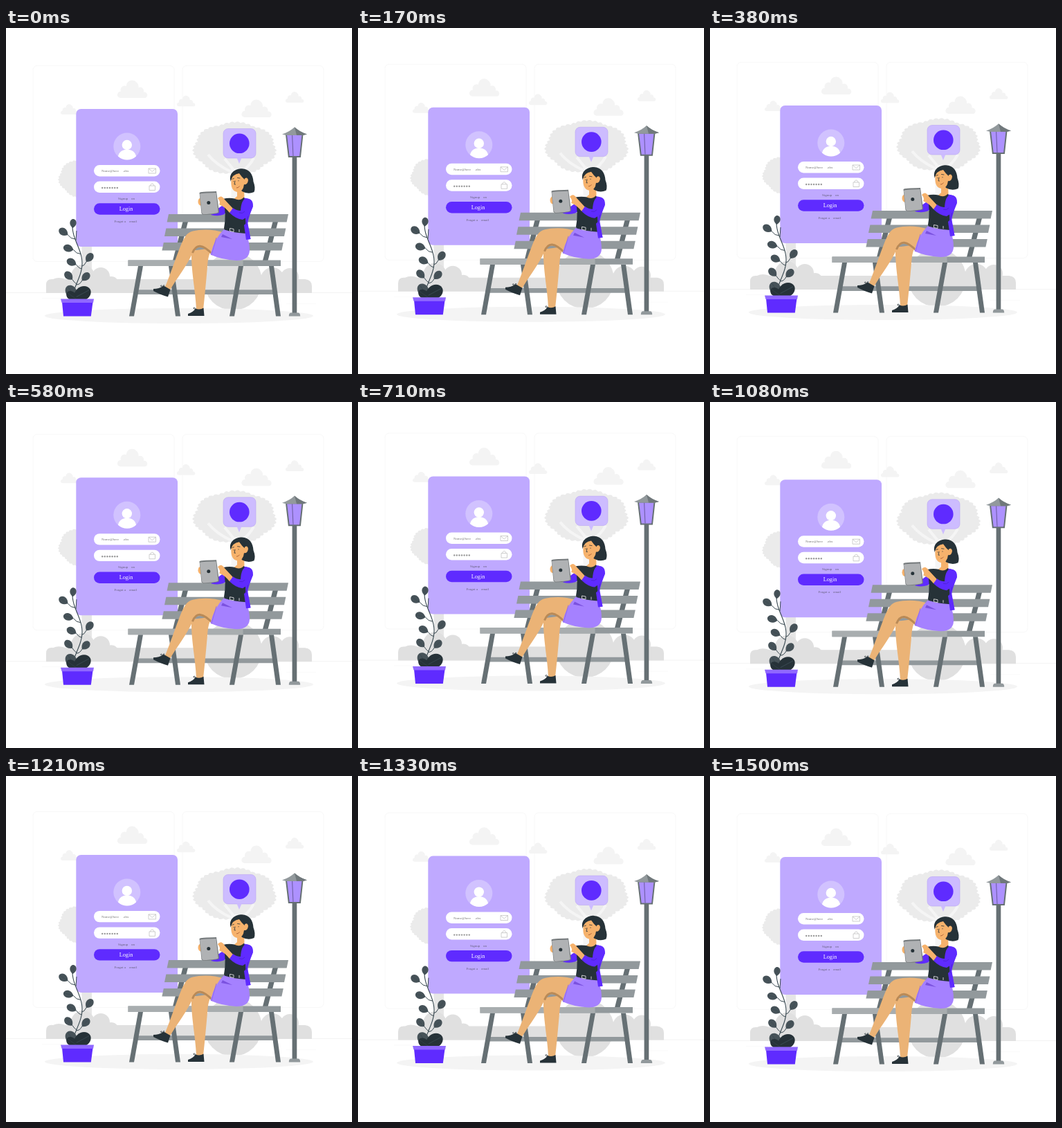
Write an HTML page that moves like this. It is 500 px wide and 500 px high and loops after 1540 ms.

```html
<!DOCTYPE html>
<html lang="en">
<head>
<meta charset="utf-8">
<title>Login on a park bench</title>
<style>
html, body { margin: 0; width: 100%; height: 100%; overflow: hidden; background: #fff; }
svg { display: block; width: 100vw; height: 100vh; }
text { font-family: "Liberation Serif", serif; }
.skin { fill: #ebb376; }
.face { fill: #f6b26c; }
.shade { fill: none; stroke: #b98a57; }
.dark { fill: #263238; }
.violet { fill: #5f2bff; }
.wood { fill: #92999c; }
.iron { fill: #667074; }
.line { fill: none; stroke: #263238; stroke-linecap: round; }
</style>
</head>
<body>
<svg viewBox="0 0 500 500">
<defs>
  <path id="cloud" d="M4 26C-2 25-1 17 5 16.5C3 11 9 7 13 9C13 1 22-2 27 3C30 5 31 8 30.5 11C35 9 39 13 38 17.5C44 17 45 25 40 26Z"/>
</defs>
<g id="scene">
  <g fill="none" stroke="#f8f8f8">
    <rect x="39" y="54.5" width="204" height="283" rx="6"/>
    <rect x="255" y="54.5" width="204" height="283" rx="6"/>
    <path stroke="#eee" stroke-width=".7" d="M0 382.5H500"/>
    <path stroke-width=".7" d="M52 390.5H84M405 398.5H448"/>
  </g>
  <g id="clouds" fill="#f4f4f4"></g>
  <g id="trees" fill="#ebebeb"></g>
  <g fill="none" stroke="#f5f5f5" stroke-width="4">
    <path d="M292 183Q304 198 326 208M316 189L330 206M358 188Q350 203 338 208"/>
    <path stroke-width="15" d="M333 203V250"/>
  </g>
  <path fill="#e6e6e6" d="M109 310H124V350H111Z"/>
  <g fill="#e0e0e0">
    <path d="M58 383V371Q58 362 68 363Q76 359 86 363H432Q442 364 442 373V383Z"/>
    <g id="bushes"></g>
  </g>
  <ellipse cx="250" cy="416" rx="194" ry="11" fill="#f4f4f4"/>

  <rect x="101.3" y="117" width="146.7" height="199" rx="7" fill="#bfa9ff"/>
  <circle cx="174.8" cy="171" r="19.5" fill="#d1c2ff"/>
  <circle cx="174.8" cy="169" r="7.2" fill="#fff"/>
  <path fill="#fff" d="M162 185.5C164 172 186 172 188 185.5A19.5 19.5 0 0 1 162 185.5Z"/>
  <rect x="127" y="198" width="95.5" height="16.4" rx="8.2" fill="#fff"/>
  <rect x="127" y="221.5" width="95.5" height="16.4" rx="8.2" fill="#fff"/>
  <rect x="127" y="253.3" width="95.5" height="16.4" rx="8.2" class="violet"/>
  <g fill="none" stroke="#bbb" stroke-width=".7">
    <path d="M206 203H216.5V210H206ZL211.2 207.5L216.5 203"/>
    <path d="M207 228H215.5V234.5H207ZM208.7 228C208.7 224 213.8 224 213.8 228"/>
  </g>
  <g id="dots" fill="#999"></g>
  <g font-size="5" fill="#777">
    <text x="138" y="208">Name@here</text><text x="169" y="208">.abx</text>
    <g fill="#66607c">
      <text x="162" y="248">Signup</text><text x="181" y="248">on</text>
      <text x="156.5" y="281">Forgot a</text><text x="178" y="281">email</text>
    </g>
  </g>
  <text x="173.5" y="264.2" font-size="8.2" fill="#fff" text-anchor="middle">Login</text>

  <g id="plant" stroke="#37474f"></g>
  <path class="violet" d="M81 396H125.5L122.8 416.5H83Z"/>
  <path fill="#9068ff" d="M79 391.5H127L126 397H80.5Z"/>

  <g id="bench"></g>

  <path class="iron" d="M413.6 186H420.3V413H413.6Z"/>
  <path class="wood" d="M408.8 416.5Q408.8 411.5 412 411.5H422Q425.2 411.5 425.2 416.5Z"/>
  <path fill="#ad91ff" stroke="#667074" stroke-width="2" d="M405 154H428.5L425 186H408.8Z"/>
  <path fill="none" stroke="#6a5a9c" d="M413.6 155L415 185"/>
  <path class="wood" d="M417 143.3Q424 150 435 153.5L429 155H405L399 153.5Q410 150 417 143.3Z"/>
  <path fill="#70787b" d="M417 143.3Q424 150 435 153.5L429 155H420Z"/>

  <rect x="314" y="145.5" width="47" height="42.5" rx="7" fill="#cdbcff" stroke="#b9a5f4" stroke-width=".6"/>
  <path fill="#cdbcff" d="M333.5 187.5H340.5L337 196Z"/>
  <circle cx="337.3" cy="166.8" r="14.3" class="violet"/>

  <g id="legs">
    <path class="skin" d="M268 322L299 318Q292 325 291 345Q288 380 285 407H275C274 380 267 350 268 322Z"/>
    <path class="skin" d="M316 296C299 290 281 291 270 293.5C261 296 258 302 253 313C246 330 238 355 230 374L237 378.5C248 360 262 343 270 324Q276 309 299 325Z"/>
    <path class="shade" stroke-width="3" d="M269.5 325C275 311 284 312 299 327.5"/>
    <path class="dark" d="M213 377Q221 377 228 372.5L237.5 378L234 388.5Q222 385 213 380Z"/>
    <path class="dark" d="M263 416V413Q270 411 274 405.5Q280 408 285.5 404.5L286.5 416Z"/>
    <path class="line" stroke-width=".8" d="M228 375Q221 373 224 372ZQ226 370 229 372M275 407Q268 405 272 404Z"/>
  </g>
  <g id="body">
    <path class="violet" d="M296 270Q303 262 317 254L321 265Q312 274 296 270Z"/>
    <path class="violet" d="M341 245Q357 246 357 258Q351 272 349 283L353.5 305L346 306Z"/>
    <path class="dark" d="M313.5 247Q322 245 330 246.5L344 244Q347 258 346 274L347 295L315 290Q319 268 313.5 247Z"/>
    <path class="face" d="M334 232L344 228L344.5 244Q338 251 330 246.5L334 243Z"/>
    <path fill="#a581ff" d="M315 291L347 296Q352 309 352 322Q351 336 333 336Q312 335 295.5 327.5Q301 304 315 291Z"/>
    <path fill="#7b52df" d="M313 298L327 305L311 302Z"/>
    <path fill="none" stroke="#8a61ef" stroke-width=".8" d="M304 303Q300 317 297 328"/>
    <path class="dark" d="M316 285.5Q331 290 346.5 290.5L347 297Q330 296 315.5 291.5Z"/>
    <path fill="none" stroke="#ddd" stroke-width=".9" d="M323.5 289.5L329 290.5V294.5L323.5 293.5ZM337 291V295"/>
    <path class="violet" d="M344 285L349 280L353.5 305L347 306Z"/>
  </g>
  <g id="arms">
    <ellipse class="face" cx="281.5" cy="251" rx="4" ry="5.5"/>
    <path fill="#74797b" d="M279.5 238Q280 236.5 304 236L308 266Q308 269 285 270L282.5 268Z"/>
    <path fill="#b0b2b4" d="M280 240Q281 238.5 303.5 238L306.7 266Q307 268 285 269.3L283 267Z"/>
    <circle class="dark" cx="292.8" cy="252.5" r="2.5"/>
    <path class="face" d="M306 246Q311 240 316 248L329 262L323 267Q316 258 308 255Q311 252 306 246Z"/>
    <path class="violet" d="M347 246Q358 247 356.5 257Q353 272 342 277Q332 276 323 267L328 260Q333 264 339 264Q340 248 347 246Z"/>
    <path fill="none" stroke="#4720c4" stroke-width=".7" d="M345 265Q342 269 337 267M350 272Q347 278 347 285"/>
  </g>
  <g id="head">
    <path class="dark" d="M324 219C323 208 333 203 341 203.3C352 204 357 212 357.5 222Q361 231 358.5 237Q350 241 341 236L333 222Z"/>
    <path class="face" d="M325.5 219Q327 210 336 209Q343 211 344 218Q349 214 350 220Q349 227 344 226Q343 237 334 237Q324 235 325.5 219Z"/>
    <path class="dark" d="M324.3 222Q323 206 338 205Q345 208 345 219Q341 216 337 210Q327 211 324.3 222Z"/>
    <path class="line" stroke-width=".8" d="M327 218.3L329.3 217.5M334.5 216.5L338 217M331 221L330 226H331.5M329 221.5v.4M336 220.5v.4"/>
    <path fill="none" stroke="#a3522c" stroke-width=".8" d="M333 231Q336 231 337.5 228.5"/>
  </g>
</g>
</svg>
<script>
const el = id => document.getElementById(id);
const each = (n, draw) => Array.from({ length: n }, (_, i) => draw(i)).join("");
const { PI, sin, cos, abs } = Math;

el("clouds").innerHTML = [[161, 75, 1], [340.5, 103, 1], [79, 110, .58], [247, 97.5, .61], [404, 92, .61]]
  .map(([x, y, s]) => `<use href="#cloud" transform="translate(${x} ${y}) scale(${s})"/>`).join("");

// Leafy crown: an ellipse with broad lobes and small scallops
function crown(cx, cy, rx, ry) {
  const n = 360;
  const pts = each(n, i => {
    const a = i / n * 2 * PI;
    const r = .96 + .07 * abs(sin(3.5 * a + .6)) + .05 * abs(sin(22 * a));
    return `${(cx + rx * r * cos(a)).toFixed(1)},${(cy + ry * r * sin(a)).toFixed(1)} `;
  });
  return `<polygon points="${pts}"/>`;
}
el("trees").innerHTML = crown(330.5, 174, 57, 36) + crown(117, 217, 39, 28);

el("bushes").innerHTML = [[111, 359, 17], [137, 359, 13], [152, 370, 11], [290, 366, 16], [328, 366, 42], [385, 363, 17], [410, 360, 13]]
  .map(([x, y, r]) => `<circle cx="${x}" cy="${y}" r="${r}"/>`).join("");

el("dots").innerHTML = each(7, i => `<circle cx="${139.2 + i * 3.6}" cy="231" r="1.2"/>`);

// Leaf growing from (x, y), turned clockwise from upright
const leaf = (x, y, turn, len = 15, color = "#465258") =>
  `<g transform="translate(${x} ${y}) rotate(${turn}) scale(${len / 15})">
    <path fill="${color}" stroke="none" d="M0 0C-9-6-5-15 0-15C5-15 9-6 0 0Z"/><path stroke-width=".5" d="M0 0V-14"/></g>`;

const stem = y => 103 + 7 * cos((y - 340) * PI / 54);
const twig = (y, dx) => `<path fill="none" d="M${stem(y + 6)} ${y + 6}Q${stem(y) + dx / 2} ${y + 6} ${stem(y) + dx} ${y}"/>`;
const sprig = (y, dx, turn) => twig(y, dx) + leaf(stem(y) + dx, y, turn);

el("plant").innerHTML =
  `<polyline fill="none" stroke-width="1.1" points="${each(54, i => `${stem(285 + 2 * i)},${285 + 2 * i} `)}"/>
   <path fill="none" d="M101 307L102 293"/>` +
  leaf(96.5, 289, 4, 13) +
  each(4, i => sprig(299 + 21.5 * i, -8.5, [-56, -74, -62, -44][i])) +
  each(2, i => sprig(338 + 27 * i, 6, 36 + 8 * i)) +
  leaf(101, 391, -34, 22) + leaf(97, 391, 62, 28, "#263238") + leaf(102, 392, -55, 17, "#263238");

// Slanted bar: top left corner, width, height and sideways lean
const bar = (x, y, w, h, lean, kind) => `<path class="${kind}" d="M${x} ${y}h${w}l${lean} ${h}h${-w}Z"/>`;

el("bench").innerHTML =
  each(2, i => bar(256 + 130 * i, 278, 7.5, 58, -15, "iron")) +
  each(3, i => bar(235 - 3.6 * i, 269 + 20.5 * i, 173, 11.5, -2.4, "wood")) +
  bar(190, 378.3, 197, 6.7, 0, "wood") +
  each(4, i => bar(191 + 145 * (i >> 1) + 44 * (i & 1), 344, 7, 72.5, i & 1 ? 10 : -13, "iron")) +
  bar(176.5, 335.5, 220.5, 8.5, 0, "wood") +
  `<path fill="#a8adaf" d="M176.5 335.5h166v8.5h-166Z"/>`;

const LOOP = 1540, STEP = 1000 / 24, PERIOD = 1500, LIFT = 10, LEAD = 30, REST = .4;
const scene = el("scene");

// Steady rise and fall, held at 24 steps per second
function draw(ms) {
  const step = Math.floor((ms % LOOP + 5) / STEP) % 37;
  const p = (step * STEP + LEAD) % PERIOD / PERIOD;
  const y = REST - LIFT * (1 - abs(1 - 2 * p));
  scene.setAttribute("transform", `translate(0 ${y.toFixed(2)})`);
}

const start = performance.now();
function tick() {
  draw(performance.now() - start);
  requestAnimationFrame(tick);
}
tick();
</script>
</body>
</html>
```
